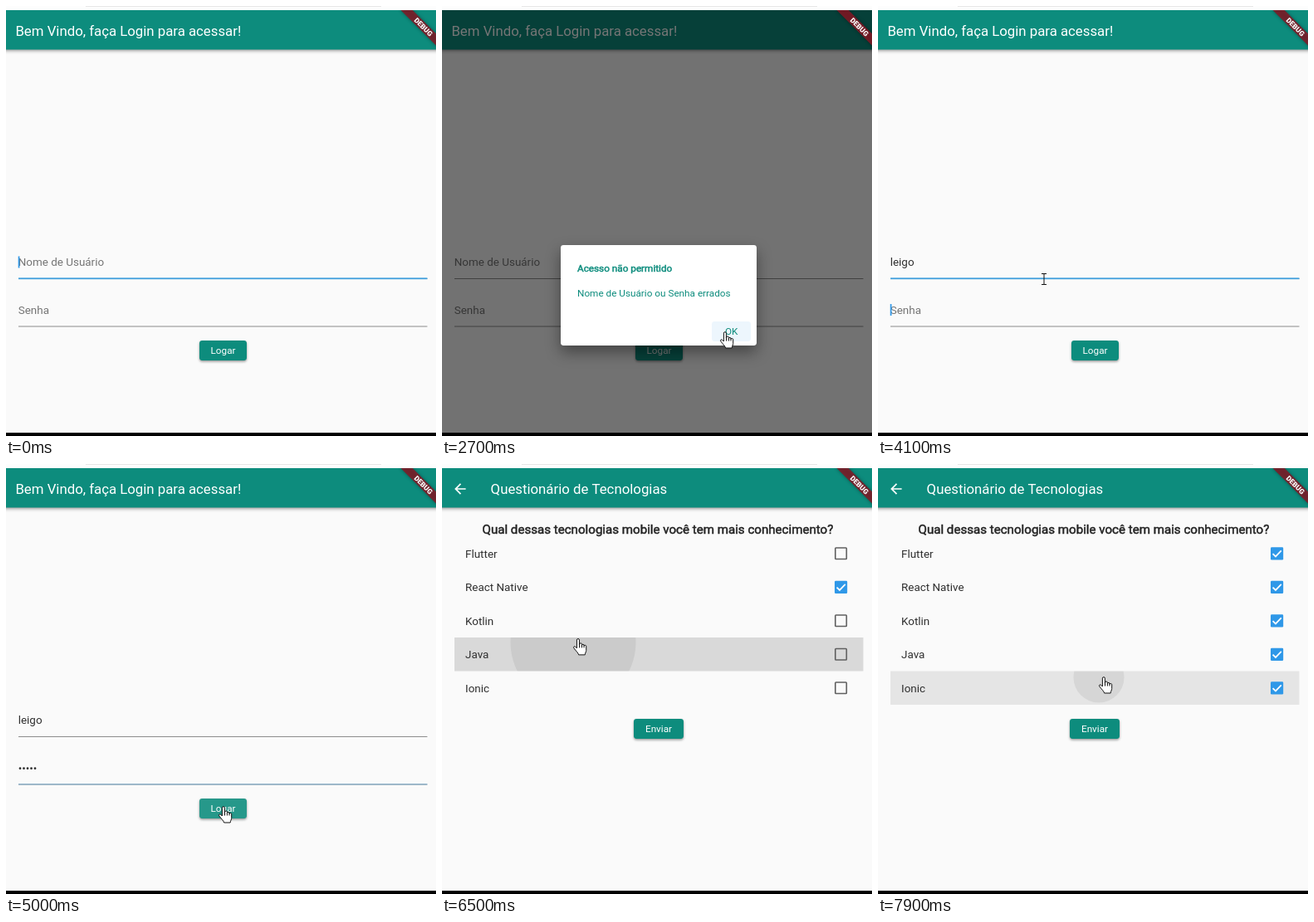
These frames come from a looping animation (518x518 px, 8 s). An HTML page with a canvas:

```html
<!DOCTYPE html>
<html lang="pt">
<head>
<meta charset="utf-8">
<style>
html, body { margin: 0; width: 100%; height: 100%; overflow: hidden; background: #fafafa; }
canvas { display: block; width: 518px; height: 518px; }
</style>
</head>
<body>
<canvas id="stage"></canvas>
<script>
const SIZE = 518, LOOP = 8000, U = 0.84;
const TEAL = '#0d8c7d', BG = '#fafafa', BLUE = '#2f98e8', GREY = '#757575', INK = '#303030';
const canvas = document.getElementById('stage');
const ctx = canvas.getContext('2d');
const dpr = window.devicePixelRatio || 1;
canvas.width = canvas.height = SIZE * dpr;

// Pointer path: time, x, y
const PATH = [
  [1050, 96, 186], [1300, 102, 312], [1650, 102, 312], [1900, 190, 345], [2050, 276, 417],
  [2350, 276, 417], [2600, 341, 393], [2850, 341, 393], [3000, 200, 329], [4700, 200, 329],
  [4900, 262, 413], [5400, 262, 413], [5600, 186, 236], [5700, 159, 197], [5900, 160, 148],
  [6100, 162, 146], [6300, 158, 215], [6400, 158, 215], [6500, 164, 211], [6700, 172, 186],
  [6850, 172, 186], [7080, 196, 110], [7300, 198, 108], [7760, 264, 257], [7840, 266, 257],
  [7900, 272, 257]
];
const ROWS = [
  { name: 'Flutter', press: 7150, check: 7250 },
  { name: 'React Native', press: 6050, check: 6150 },
  { name: 'Kotlin', press: 6750, check: 6850 },
  { name: 'Java', press: 6350, check: 6520 },
  { name: 'Ionic', press: 7840, check: 7880 }
];
const ROW_TOP = 87.5, ROW_H = 40.5;
const LOGIN_BTN = [233, 403, 57, 24], SEND_BTN = [231, 307, 60, 24], OK_BTN = [325, 380, 47, 24];
const HAND = new Path2D('M-1.6 11V1.2a1.5 1.5 0 0 1 3 0V7l.1-.7a1.5 1.5 0 0 1 3 .4v.6a1.4 1.4 0 0 1 2.7.5v.5' +
  'a1.3 1.3 0 0 1 2.5.5V13.5c0 2-1.3 3-1.5 5.5H.6C.4 17-3 14-5.3 10.8c-.9-1.6 1-2.5 2-1.5z');
const ARROW = new Path2D('M0 0V15l3.5-3.3 2.3 5.3 2.2-1-2.3-5.1H10.5z');
const BACK = new Path2D('M20 11H7.83l5.59-5.59L12 4l-8 8 8 8 1.41-1.41L7.83 13H20z');

const clamp = v => Math.max(0, Math.min(1, v));
const ramp = (t, from, to) => clamp((t - from) / (to - from));
const inside = ([px, py], [x, y, w, h]) => px >= x && px < x + w && py >= y && py < y + h;

function pointer(t) {
  const i = PATH.findIndex(p => p[0] > t);
  if (i === 0) return null;
  if (i < 0) return PATH[PATH.length - 1].slice(1);
  const [t0, x0, y0] = PATH[i - 1], [t1, x1, y1] = PATH[i];
  const k = ramp(t, t0, t1);
  return [x0 + (x1 - x0) * k, y0 + (y1 - y0) * k];
}

function rect(x, y, w, h, color) {
  ctx.fillStyle = color;
  ctx.fillRect(x, y, w, h);
}

function rounded(x, y, w, h, r, color) {
  ctx.beginPath();
  ctx.roundRect(x, y, w, h, r);
  ctx.fillStyle = color;
  ctx.fill();
}

function shadow(blur, dy, alpha) {
  ctx.shadowColor = `rgba(0,0,0,${alpha})`;
  ctx.shadowBlur = blur * dpr;
  ctx.shadowOffsetY = dy * dpr;
}

function text(str, x, y, size, color, bold = false) {
  ctx.font = `${size * U}px Roboto, sans-serif`;
  ctx.fillStyle = ctx.strokeStyle = color;
  ctx.fillText(str, x, y);
  if (bold) {
    ctx.lineWidth = 0.5;
    ctx.strokeText(str, x, y);
  }
}

function appBar(title, x) {
  ctx.save();
  shadow(4, 1.5, 0.4);
  rect(-10, 5, SIZE + 20, 47.5, TEAL);
  ctx.restore();
  text(title, x, 36, 20, '#fff');
}

function button([x, y, w, h], label, hover) {
  ctx.save();
  shadow(3, 1.5, 0.4);
  rounded(x, y, w, h, 3.4, TEAL);
  ctx.restore();
  if (hover) rounded(x, y, w, h, 3.4, 'rgba(255,255,255,.1)');
  ctx.textAlign = 'center';
  text(label, x + w / 2, y + 16, 14, '#fff');
  ctx.textAlign = 'left';
}

function field(hint, value, base, focus) {
  text(value || hint, 14.7, base, 16, value ? INK : GREY);
  rect(15, base + 15, 492.5, 1, '#8c8c8c');
  if (focus > 0) rect(15, base + 14.4, 492.5, 1.8, `rgba(62,158,220,${focus})`);
}

function caret(value, base, age) {
  ctx.font = `${16 * U}px Roboto, sans-serif`;
  const x = 14.7 + ctx.measureText(value).width;
  const a = clamp(0.5 + 0.9 * Math.cos(age * Math.PI / 500));
  rect(x, base - 11.5, 1.7, 14, `rgba(47,152,232,${a})`);
}

const typed = (full, t, times) => full.slice(0, times.filter(s => t >= s).length);

function login(t, pos) {
  rect(0, 5, SIZE, 509, BG);
  appBar('Bem Vindo, faça Login para acessar!', 11.4);
  const user = typed('leigo', t, [3390, 3450, 3500, 3600, 3800]);
  const pass = typed('•••••', t, [4200, 4300, 4400, 4500, 4600]);
  const userFocus = t < 3000 ? 1 - ramp(t, 1900, 2050) : ramp(t, 3120, 3200) - ramp(t, 4110, 4260);
  const passFocus = ramp(t, 4110, 4260) - ramp(t, 4900, 5050);
  field('Nome de Usuário', user, 313, userFocus);
  field('Senha', pass, 370.5, passFocus);
  if (t < 1900) caret('', 313, t);
  else if (t >= 3150 && t < 4080) caret(user, 313, t < 3390 ? t - 3150 : 0);
  else if (t >= 4080 && t < 4900) caret(pass, 370.5, t < 4600 ? 0 : t - 4600);
  button(LOGIN_BTN, 'Logar', pos && t < 2150 && inside(pos, LOGIN_BTN) || t > 4800);
}

function dialog(t, pos) {
  const a = ramp(t, 2150, 2300) - ramp(t, 2850, 2990);
  if (a <= 0) return;
  ctx.save();
  ctx.globalAlpha = a;
  rect(0, 5, SIZE, 509, 'rgba(0,0,0,.54)');
  ctx.save();
  shadow(18, 8, 0.4);
  rounded(143, 288, 236, 121, 3.4, '#fff');
  ctx.restore();
  text('Acesso não permitido', 163, 319.5, 14, TEAL, true);
  text('Nome de Usuário ou Senha errados', 163, 350, 14, TEAL);
  if (inside(pos, OK_BTN)) rounded(...OK_BTN, 3.4, '#edf6fd');
  text('OK', 341, 395.5, 14, TEAL);
  ctx.restore();
}

function checkbox(cy, on) {
  const x = 473, y = cy - 7.5;
  if (!on) {
    ctx.beginPath();
    ctx.roundRect(x + 0.8, y + 0.8, 13.5, 13.5, 0.8);
    ctx.strokeStyle = '#606060';
    ctx.lineWidth = 1.6;
    ctx.stroke();
    return;
  }
  rounded(x, y, 15.2, 15.2, 1.3, BLUE);
  ctx.beginPath();
  ctx.moveTo(x + 2.6, y + 7.8);
  ctx.lineTo(x + 6, y + 11.2);
  ctx.lineTo(x + 12.8, y + 4.2);
  ctx.strokeStyle = '#fff';
  ctx.lineWidth = 1.7;
  ctx.stroke();
}

function row(item, i, t, hoverPos) {
  const top = ROW_TOP + i * ROW_H, box = [15, top, 492.5, ROW_H], cy = top + ROW_H / 2;
  const age = t - item.press;
  const hover = t > 5400 && inside(hoverPos, box) || age >= 0 && age < 200;
  const glow = ramp(age, 0, 160) - ramp(age, 200, 400);
  const shade = (hover ? 0.05 : 0) + 0.09 * glow;
  if (shade > 0) rect(...box, `rgba(0,0,0,${shade})`);
  if (age > 0 && age < 400) {
    const [x, y] = pointer(item.press);
    ctx.save();
    ctx.beginPath();
    ctx.rect(...box);
    ctx.clip();
    ctx.beginPath();
    ctx.arc(x, y, age * 0.5, 0, 7);
    ctx.fillStyle = `rgba(0,0,0,${0.065 * (1 - ramp(age, 200, 400))})`;
    ctx.fill();
    ctx.restore();
  }
  text(item.name, 28, cy + 4.8, 16, INK);
  checkbox(cy, t >= item.check);
}

function quiz(t) {
  const k = ramp(t, 5020, 5300);
  if (k <= 0) return;
  ctx.save();
  ctx.globalAlpha = k * k;
  ctx.translate(0, 110 * (1 - k) ** 3);
  rect(0, 5, SIZE, 509, BG);
  appBar('Questionário de Tecnologias', 58.6);
  ctx.save();
  ctx.translate(11.8, 19.9);
  ctx.scale(U, U);
  ctx.fillStyle = '#fff';
  ctx.fill(BACK);
  ctx.restore();
  text('Qual dessas tecnologias mobile você tem mais conhecimento?', 48.5, 84.3, 18, '#222', true);
  const hoverPos = pointer(t - 100);
  ROWS.forEach((item, i) => row(item, i, t, hoverPos));
  button(SEND_BTN, 'Enviar', false);
  ctx.restore();
}

function banner() {
  ctx.save();
  ctx.translate(523, 5);
  ctx.rotate(Math.PI / 4);
  ctx.scale(U, U);
  ctx.save();
  shadow(4, 0, 0.45);
  rect(-40, 28, 80, 12, 'rgba(135,22,36,.82)');
  ctx.restore();
  ctx.font = '900 10.2px Roboto, sans-serif';
  ctx.textAlign = 'center';
  ctx.fillStyle = '#fff';
  ctx.fillText('DEBUG', 0, 37.6);
  ctx.restore();
}

function cursorKind(t, pos) {
  const [x, y] = pos;
  if (t > 5050) return y >= ROW_TOP && y < ROW_TOP + ROW_H * 5 ? 'hand' : 'arrow';
  if (t > 2200 && t < 2900) return inside(pos, OK_BTN) ? 'hand' : 'arrow';
  if (inside(pos, LOGIN_BTN)) return 'hand';
  const inField = x > 15 && x < 508 && (y > 290 && y < 332 || y > 347 && y < 389);
  return inField ? 'beam' : 'arrow';
}

function cursor(t, pos) {
  if (!pos) return;
  const kind = cursorKind(t, pos);
  ctx.save();
  ctx.translate(...pos);
  ctx.lineWidth = 1;
  ctx.strokeStyle = '#111';
  if (kind === 'beam') {
    ctx.beginPath();
    ctx.moveTo(-3, -6.5); ctx.lineTo(3, -6.5);
    ctx.moveTo(0, -6.5); ctx.lineTo(0, 6.5);
    ctx.moveTo(-3, 6.5); ctx.lineTo(3, 6.5);
    ctx.stroke();
  } else {
    const shape = kind === 'hand' ? HAND : ARROW;
    ctx.fillStyle = '#fff';
    ctx.fill(shape);
    ctx.stroke(shape);
    if (kind === 'hand') {
      ctx.beginPath();
      for (const x of [1.5, 4.4, 7]) {
        ctx.moveTo(x, 7);
        ctx.lineTo(x, 10.5);
      }
      ctx.stroke();
    }
  }
  ctx.restore();
}

function draw(t) {
  ctx.setTransform(dpr, 0, 0, dpr, 0, 0);
  const pos = pointer(t);
  ctx.save();
  ctx.beginPath();
  ctx.rect(0, 5, SIZE, 509);
  ctx.clip();
  login(t, pos);
  dialog(t, pos);
  quiz(t);
  banner();
  ctx.restore();
  rect(0, 0, SIZE, 5, '#fdfdfd');
  rect(96, 0, 356, 1, '#e6e6e6');
  rect(0, 514, SIZE, 4, '#000');
  cursor(t, pos);
}

const start = performance.now();
function tick() {
  draw((performance.now() - start) % LOOP);
  requestAnimationFrame(tick);
}
tick();
</script>
</body>
</html>
```
